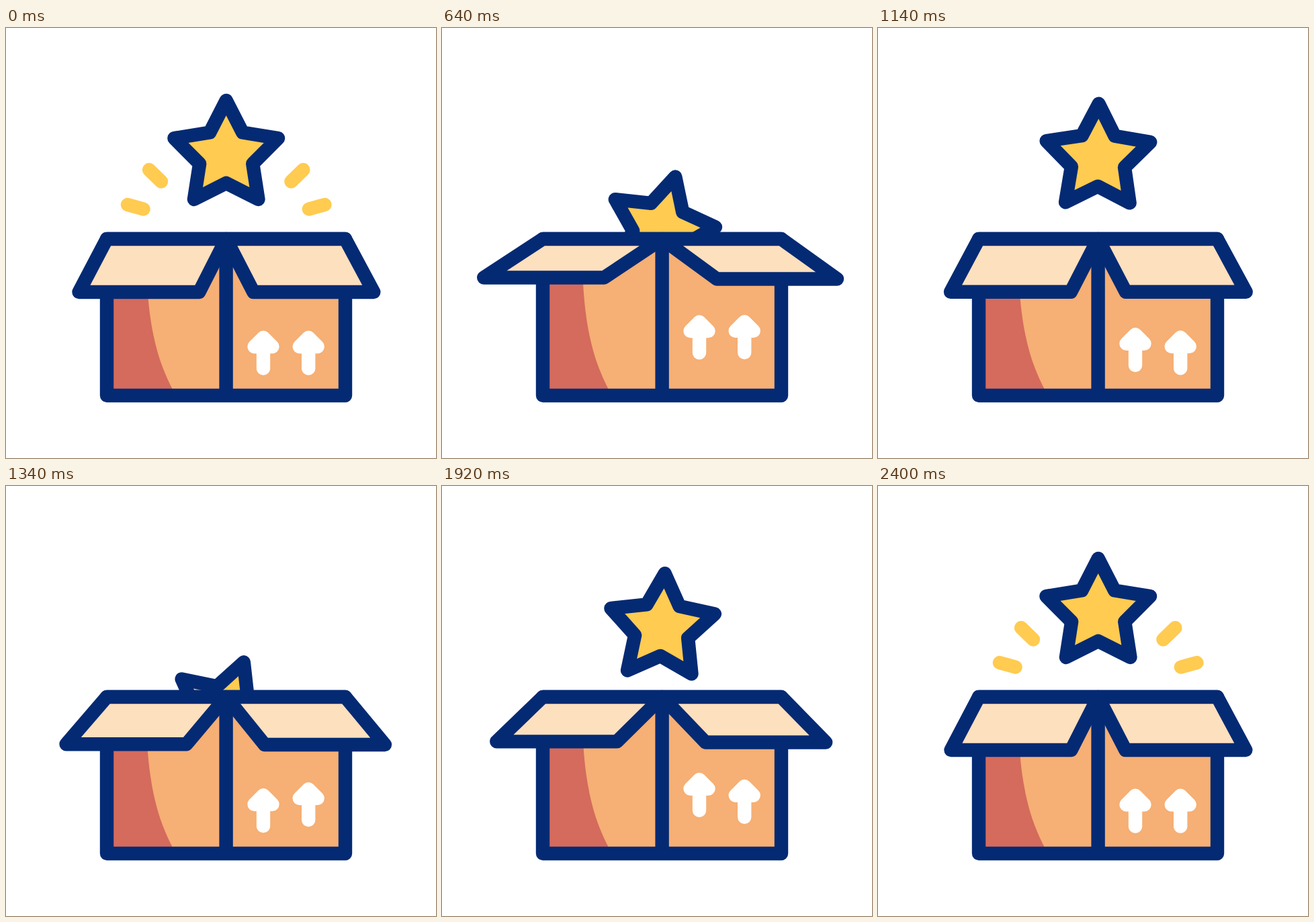
An HTML page for the animation above (2420 ms loop, 640 by 640 pixels).

```html
<!DOCTYPE html>
<html lang="en">
<head>
<meta charset="utf-8">
<title>Unboxing</title>
<style>
  html, body { margin: 0; width: 100%; height: 100%; overflow: hidden; background: #fff; }
  svg { display: block; width: 100%; height: 100%; }
  .line { stroke: #042a74; }
  .ray { stroke: #ffcb50; }
  .arrow { fill: #fff; stroke: #fff; }
</style>
</head>
<body>
<svg viewBox="0 0 640 640" fill="none" stroke-width="20.4" stroke-linecap="round" stroke-linejoin="round">
  <g id="rays"></g>
  <path id="star" class="line" fill="#ffcb50"/>
  <path d="M150 314H505V547H150Z" fill="#f6af74"/>
  <path d="M150 340H209C209 430 223 491 248 538H150Z" fill="#d46b5d"/>
  <path class="line" d="M150 314H505V547H150ZM327.6 314V547"/>
  <path id="arrowL" class="arrow" d="M383 460.8L396.5 474.3H369.5ZM383 474V506.6"/>
  <path id="arrowR" class="arrow" d="M450.2 460.8L463.7 474.3H436.7ZM450.2 474V506.6"/>
  <path id="flapL" class="line" fill="#fde0be"/>
  <path id="flapR" class="line" fill="#fde0be"/>
</svg>
<script>
const LOOP = 2420, CYCLE = 1108, HALF = CYCLE / 2, MID_X = 327.7;
const $ = id => document.getElementById(id);

const ease = (t, from, to) => {
  const u = Math.min(1, Math.max(0, (t - from) / (to - from)));
  return u * u * (3 - 2 * u);
};

// Rises from 0 to 1 and falls back once per cycle, for two cycles.
const swing = t => {
  if (t < 0 || t >= 2 * CYCLE) return 0;
  const c = t % CYCLE;
  return ease(c, 0, HALF) - ease(c, HALF, CYCLE);
};

// Inner and outer end of the two left-hand rays; the right side is mirrored.
const rays = [[231, 228.5, 213, 211], [204.5, 269.5, 181, 263]].flatMap(ends =>
  [1, -1].map(side => {
    const node = document.createElementNS("http://www.w3.org/2000/svg", "path");
    node.setAttribute("class", "ray");
    $("rays").append(node);
    return { node, ends, side };
  }));

// Start and end of the visible part of a ray, and how far it has drifted outwards.
function rayState(t) {
  if (t < 600) {
    const out = ease(t, 0, 360);
    return [out, 1, 10.2 * out];
  }
  if (t < 1700) return [ease(t, 800, 1150), ease(t, 785, 1015), 10.2 * ease(t, 840, 1150)];
  return [0, ease(t, 1980, 2260), 0];
}

function drawRays(t) {
  const [start, end, drift] = rayState(t);
  for (const { node, ends: [x0, y0, x1, y1], side } of rays) {
    const point = k => {
      const x = x0 + (x1 - x0) * k - drift, y = y0 + (y1 - y0) * k - drift;
      return `${MID_X + side * (x - MID_X)} ${y}`;
    };
    node.setAttribute("d", end - start > 0.01 ? `M${point(start)}L${point(end)}` : "");
  }
}

function drawFlap(id, hinge, inner, tip, dx, dy) {
  const y = 393 - dy;
  $(id).setAttribute("d", `M${hinge} 314H327.6L${inner + dx} ${y}H${tip + dx}Z`);
}

const lift = (id, amount) => $(id).setAttribute("transform", `translate(0 ${-25.2 * amount})`);

$("star").setAttribute("d", "M" + Array.from({ length: 10 }, (_, i) => {
  const a = i * Math.PI / 5, r = i % 2 ? 41.6 : 81.3;
  return `${r * Math.sin(a)} ${7.6 - r * Math.cos(a)}`;
}).join("L") + "Z");

function draw() {
  const t = performance.now() % LOOP;
  const open = swing(t);
  drawFlap("flapL", 150, 287.5, 108.5, -49.6 * open, 23 * open);
  drawFlap("flapR", 505, 368.3, 547.3, 43.6 * open, 20.9 * open);
  lift("arrowR", open);
  lift("arrowL", swing(t - 182));

  const c = t < 2 * CYCLE ? t % CYCLE : 0;
  const sink = ease(c, 0, 369) - ease(c, 369, 923);
  $("star").setAttribute("transform", `translate(${MID_X} ${181.6 + 216 * sink}) rotate(${30 * sink})`);

  drawRays(t);
  requestAnimationFrame(draw);
}
draw();
</script>
</body>
</html>
```
